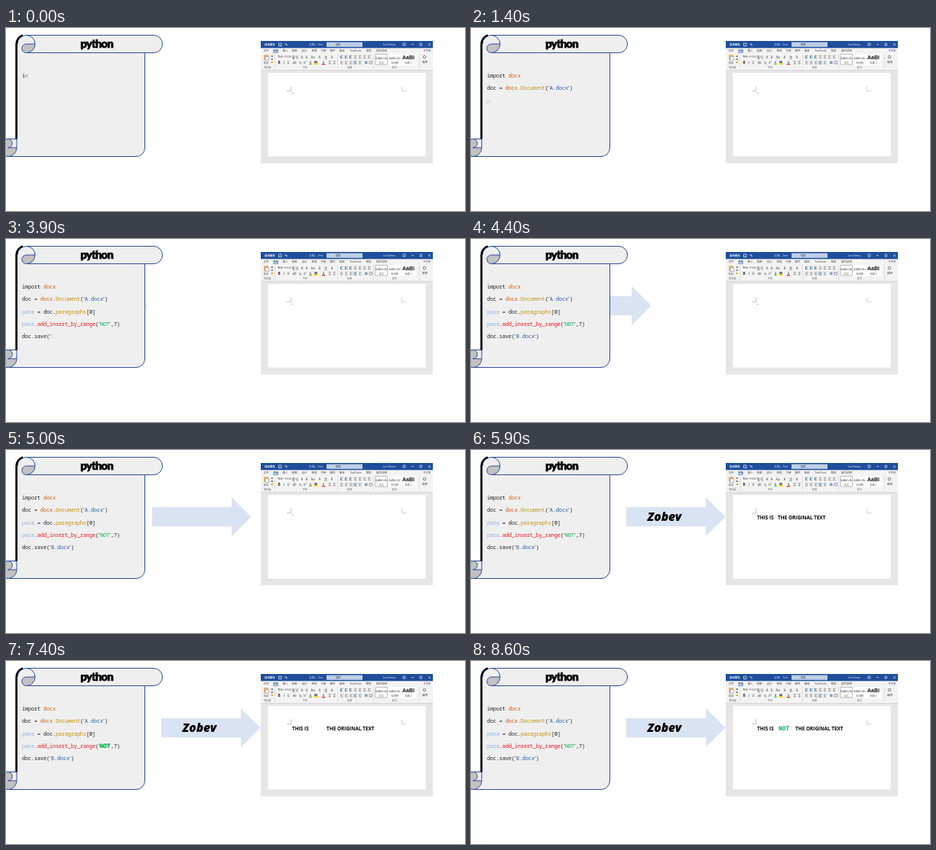
An HTML page with a canvas that plays this animation: 600 by 240 pixels, repeating every 8700 ms.

```html
<!DOCTYPE html>
<html lang="en">
<head>
<meta charset="utf-8">
<title>Insert text into a document</title>
<style>
  html, body { margin: 0; width: 100%; height: 100%; overflow: hidden; background: #fff; }
  canvas { display: block; width: 600px; height: 240px; }
</style>
</head>
<body>
<canvas id="stage"></canvas>
<script>
const LOOP = 8700;
const canvas = document.getElementById('stage');
const ctx = canvas.getContext('2d');
const dpr = window.devicePixelRatio || 1;
canvas.width = 600 * dpr;
canvas.height = 240 * dpr;

const MONO = '"Noto Sans Mono", "DejaVu Sans Mono", monospace';
const UI = '"Noto Sans CJK SC", "Noto Sans CJK", "Noto Sans", sans-serif';
const INK = '#1c1c1c', BLUE = '#2f5597', SKY = '#8fb0e0', GOLD = '#bf9000',
      RUST = '#c55a11', RED = '#e8101a', GREEN = '#00b050', EDGE = '#2f4d9a';

// Each line is a list of [text, colour] runs.
const CODE = [
  [['import ', INK], ['docx', RUST]],
  [['doc = ', INK], ['docx', RUST], ['.Document', GOLD], ['(', INK], ['’A.docx’', BLUE], [')', INK]],
  [['para', SKY], [' = doc.', INK], ['paragraphs', GOLD], ['[0]', INK]],
  [['para', SKY], ['.add_insert_by_range', RED], ['(', INK], ['’', BLUE], ['NOT', GREEN], ['’', BLUE], [',7)', INK]],
  [['doc.save(', INK], ['’B.docx’', BLUE], [')', INK]]
];

const clamp = v => Math.max(0, Math.min(1, v));
const ease = u => u < 0.5 ? 2 * u * u : 1 - 2 * (1 - u) * (1 - u);
const progress = (t, start, length) => ease(clamp((t - start) / length));

function rect(x, y, w, h, fill) {
  ctx.fillStyle = fill;
  ctx.fillRect(x, y, w, h);
}

function line(color, width, ...pts) {
  ctx.strokeStyle = color;
  ctx.lineWidth = width;
  ctx.beginPath();
  for (let i = 0; i < pts.length; i += 2) ctx.lineTo(pts[i], pts[i + 1]);
  ctx.stroke();
}

function text(str, x, y, font, fill, align = 'left') {
  ctx.font = font;
  ctx.fillStyle = fill;
  ctx.textAlign = align;
  ctx.fillText(str, x, y);
}

function shape(path, fill) {
  ctx.fillStyle = fill;
  ctx.fill(path);
  ctx.strokeStyle = EDGE;
  ctx.lineWidth = 1;
  ctx.stroke(path);
}

const sheet = new Path2D();
sheet.moveTo(2, 168.5);
sheet.arc(2, 157, 11.5, Math.PI / 2, Math.PI * 1.5);
sheet.lineTo(14.5, 145.5);
sheet.lineTo(14.5, 21);
sheet.arc(26.5, 21, 11.5, Math.PI, Math.PI * 1.5);
sheet.lineTo(193, 9.5);
sheet.arc(193, 21, 11.5, -Math.PI / 2, Math.PI / 2);
sheet.lineTo(181.5, 32.5);
sheet.lineTo(181.5, 157);
sheet.arc(170, 157, 11.5, 0, Math.PI / 2);
sheet.closePath();

const topCurl = new Path2D();
topCurl.moveTo(38, 21);
topCurl.arc(26.5, 21, 11.5, 0, Math.PI / 2);
topCurl.arc(26.5, 26.75, 5.75, Math.PI / 2, Math.PI * 1.5);
topCurl.closePath();

const lowCurl = new Path2D();
lowCurl.moveTo(14, 157);
lowCurl.arc(2.5, 157, 11.5, 0, Math.PI * 1.5);
lowCurl.arc(2.5, 151.25, 5.75, -Math.PI / 2, Math.PI / 2);
lowCurl.closePath();

function drawScroll() {
  shape(sheet, '#efefef');
  // heavy shaded edge on the left
  ctx.strokeStyle = '#000';
  ctx.lineWidth = 2.6;
  ctx.beginPath();
  ctx.moveTo(13.6, 145.5);
  ctx.lineTo(13.6, 21);
  ctx.arc(25.6, 21, 12, Math.PI, Math.PI * 1.4);
  ctx.stroke();
  // rolled rim at the top
  ctx.strokeStyle = EDGE;
  ctx.lineWidth = 1;
  ctx.beginPath();
  ctx.moveTo(181.5, 32.5);
  ctx.lineTo(26.5, 32.5);
  ctx.moveTo(26.5, 9.5);
  ctx.arc(26.5, 21, 11.5, -Math.PI / 2, 0);
  ctx.stroke();
  shape(topCurl, '#c2c2c2');
  shape(lowCurl, '#c2c2c2');
  line(EDGE, 1, 14, 145.5, 14, 157);
}

function drawTitle() {
  ctx.letterSpacing = '-0.9px';
  text('python', 118.5, 26, '900 15px Lato, sans-serif', '#000', 'center');
  ctx.strokeStyle = '#000';
  ctx.lineWidth = 0.5;
  ctx.strokeText('python', 118.5, 26);
  ctx.letterSpacing = '0px';
}

function drawCode(t) {
  let typed = 0;
  CODE.forEach((runs, row) => {
    let x = 21;
    for (const [str, color] of runs) {
      for (const ch of str) {
        const step = ch === '’' ? 2 : 4;
        if (ch !== ' ') {
          ctx.globalAlpha = clamp((t + 50 - 38.7 * typed++) / 30);
          text(ch, x + step / 2, 65.2 + 16.2 * row, '500 6.7px ' + MONO, color, 'center');
        }
        x += step;
      }
    }
  });
  ctx.globalAlpha = 1;
}

function drawArrow(t) {
  const tip = 180.5 + 152 * progress(t, 3720, 1600);
  const neck = tip - 25.5;
  const tail = tip - 129.5;
  ctx.fillStyle = '#dae3f3';
  ctx.beginPath();
  [[tail, 75], [neck, 75], [neck, 62], [tip, 87.5], [neck, 113], [neck, 100.3], [tail, 100.3]]
    .forEach(([x, y]) => ctx.lineTo(x, y));
  ctx.fill();
}

const labels = (list, y, size, fill) =>
  list.forEach(([str, x]) => text(str, x, y, size + 'px ' + UI, fill, 'center'));

function drawTitleBar() {
  rect(333, 17, 225, 9.5, '#1f4e9c');
  text('自动保存', 338, 23.4, 'bold 3.4px ' + UI, '#fff');
  line('#fff', 0.7, 356.5, 20, 360, 20, 360, 23.5, 356.5, 23.5, 356.5, 20);
  line('#fff', 0.7, 364, 21, 367, 21, 367, 23.5);
  text('文档1 - Text', 405, 23.2, '3.4px ' + UI, '#dbe6f7', 'center');
  rect(419, 18.6, 47, 6.2, '#bfcfe9');
  text('搜索', 431, 23, '3.3px ' + UI, '#345', 'left');
  text('Lin Oreva', 501, 23.2, '3.5px ' + UI, '#fff', 'center');
  line('#fff', 0.6, 519, 20, 522, 20, 522, 23, 519, 23, 519, 20);
  line('#fff', 0.6, 530, 21.6, 533, 21.6);
  line('#fff', 0.6, 541, 20.2, 543.6, 20.2, 543.6, 23, 541, 23, 541, 20.2);
  line('#fff', 0.6, 552, 20.2, 555, 23.2);
  line('#fff', 0.6, 555, 20.2, 552, 23.2);
}

function drawRibbon() {
  rect(333, 26.5, 225, 29, '#f3f3f3');
  labels([['文件', 340], ['插入', 365], ['绘图', 377], ['设计', 390], ['布局', 403], ['引用', 415],
    ['邮件', 427], ['审阅', 439], ['TextTools', 457], ['帮助', 474], ['操作说明', 491]], 30.8, 3.5, '#444');
  text('开始', 352.5, 30.8, 'bold 3.5px ' + UI, '#1f4e9c', 'center');
  line('#1f4e9c', 0.7, 349, 32.2, 356, 32.2);
  text('共享', 552, 30.8, '3.3px ' + UI, '#1f4e9c', 'center');
  rect(546, 28, 2, 2.5, '#e49a9a');

  // clipboard
  rect(337, 35, 6, 7, '#e3b577');
  rect(339, 37.5, 4.5, 5, '#fff');
  line('#777', 0.5, 339, 37.5, 343.5, 37.5, 343.5, 42.5, 339, 42.5, 339, 37.5);
  rect(346.5, 36, 2.5, 2, '#888');
  rect(346.5, 40, 2.5, 2, '#888');
  rect(346.5, 44, 2.5, 2, '#e0a050');
  labels([['粘贴', 340]], 47, 3.2, '#555');

  // font group
  rect(354, 35, 27, 5.6, '#fff');
  text('等线 (中文正文)', 355, 39.2, '3.3px ' + UI, '#333');
  labels([['五号', 378], ['A', 387], ['A', 393], ['Aa', 401], ['A', 410], ['文', 418], ['A', 426]], 39.6, 4.2, '#444');
  text('B', 357, 47, 'bold 4.6px ' + UI, '#222', 'center');
  text('I', 363, 47, 'italic 4.6px ' + UI, '#222', 'center');
  labels([['U', 369], ['ab', 377], ['x₂', 385], ['x²', 391], ['A', 398], ['A', 415], ['字', 423], ['字', 429]], 46.8, 4.2, '#444');
  rect(396.3, 47, 3.5, 1, '#55b96a');
  rect(403, 43.2, 4, 3, '#777');
  rect(402.5, 46.2, 5, 1.8, '#ffd800');
  rect(412.8, 47, 4.4, 1.3, '#e33');

  // paragraph group
  for (let i = 0; i < 7; i++) {
    const x = 437 + 6 * i;
    for (let j = 0; j < 3; j++) {
      line('#666', 0.6, x, 36.3 + 1.6 * j, x + 3.6 - (j % 2), 36.3 + 1.6 * j);
      if (i < 5) line('#666', 0.6, x, 43.8 + 1.6 * j, x + 3.6 - (j % 2), 43.8 + 1.6 * j);
    }
    if (i < 3) rect(x, 36, 0.9, 4, '#4878c0');
  }
  rect(453.5, 42.8, 5, 5, 'rgba(120,150,200,.35)');
  rect(469, 43.5, 3.5, 3.5, '#7d9fd0');
  line('#666', 0.6, 475, 43.6, 478.5, 43.6, 478.5, 47, 475, 47, 475, 43.6);

  // style tiles
  rect(482.5, 34, 54, 14.5, '#fff');
  line('#a9a9a9', 0.8, 483, 34.4, 498.5, 34.4, 498.5, 48, 483, 48, 483, 34.4);
  text('AaBbCcDc', 490.8, 40.5, '3.2px ' + UI, '#222', 'center');
  text('AaBbCcDc', 508, 40.5, '3.2px ' + UI, '#222', 'center');
  text('AaBl', 526, 41, 'bold 7px "Liberation Sans", sans-serif', '#111', 'center');
  labels([['正文', 490.8], ['无间隔', 508], ['标题 1', 526]], 46.8, 3.2, '#555');

  ctx.strokeStyle = '#555';
  ctx.lineWidth = 0.7;
  ctx.beginPath();
  ctx.arc(547, 38, 1.8, 0, Math.PI * 2);
  ctx.stroke();
  labels([['编辑', 547.5]], 45.5, 3.4, '#444');
  labels([['剪贴板', 342], ['字体', 391], ['段落', 449], ['样式', 508]], 53.4, 3.2, '#666');
  for (const x of [351.5, 433.5, 480.5, 540.5]) line('#d2d2d2', 0.6, x, 34, x, 53.5);
}

function drawWindow() {
  rect(333, 17, 225, 160.5, '#e6e6e6');
  drawTitleBar();
  drawRibbon();
  line('#cfcfcf', 0.7, 333, 55.5, 558, 55.5);
  rect(342.5, 59, 206, 109.5, '#fff');
  line('#b4b4b4', 0.8, 367, 82.7, 372.7, 82.7, 372.7, 76.5);
  line('#c6c6c6', 0.8, 523.5, 82.7, 517.5, 82.7, 517.5, 76.5);
}

function drawDocText(t) {
  if (t < 5600) {
    line('#888', 0.7, 373.5, 85.4, 375.5, 85.4);
    return;
  }
  const font = 'bold 6.45px "Open Sans", "Noto Sans", sans-serif';
  text('THIS IS', 374, 91.4, font, '#000');
  text('THE ORIGINAL TEXT', 401 + 23 * progress(t, 6060, 2000), 91.4, font, '#000');
}

function drawInsert(t) {
  if (t < 7340) return;
  const u = progress(t, 7340, 1250);
  text('NOT', 121 + 281 * u, 113.8 - 22.8 * u, 'bold 7.8px "DejaVu Sans Mono", monospace', GREEN);
}

function draw(t) {
  ctx.setTransform(dpr, 0, 0, dpr, 0, 0);
  rect(0, 0, 600, 240, '#fff');
  drawArrow(t);
  drawScroll();
  drawTitle();
  drawCode(t);
  drawWindow();
  if (t >= 5500) text('Zobev', 253, 93, 'italic 800 15.5px "Open Sans", "Noto Sans", sans-serif', '#000', 'center');
  drawDocText(t);
  drawInsert(t);
}

const began = performance.now();
function tick() {
  draw((performance.now() - began) % LOOP);
  requestAnimationFrame(tick);
}
tick();
</script>
</body>
</html>
```
